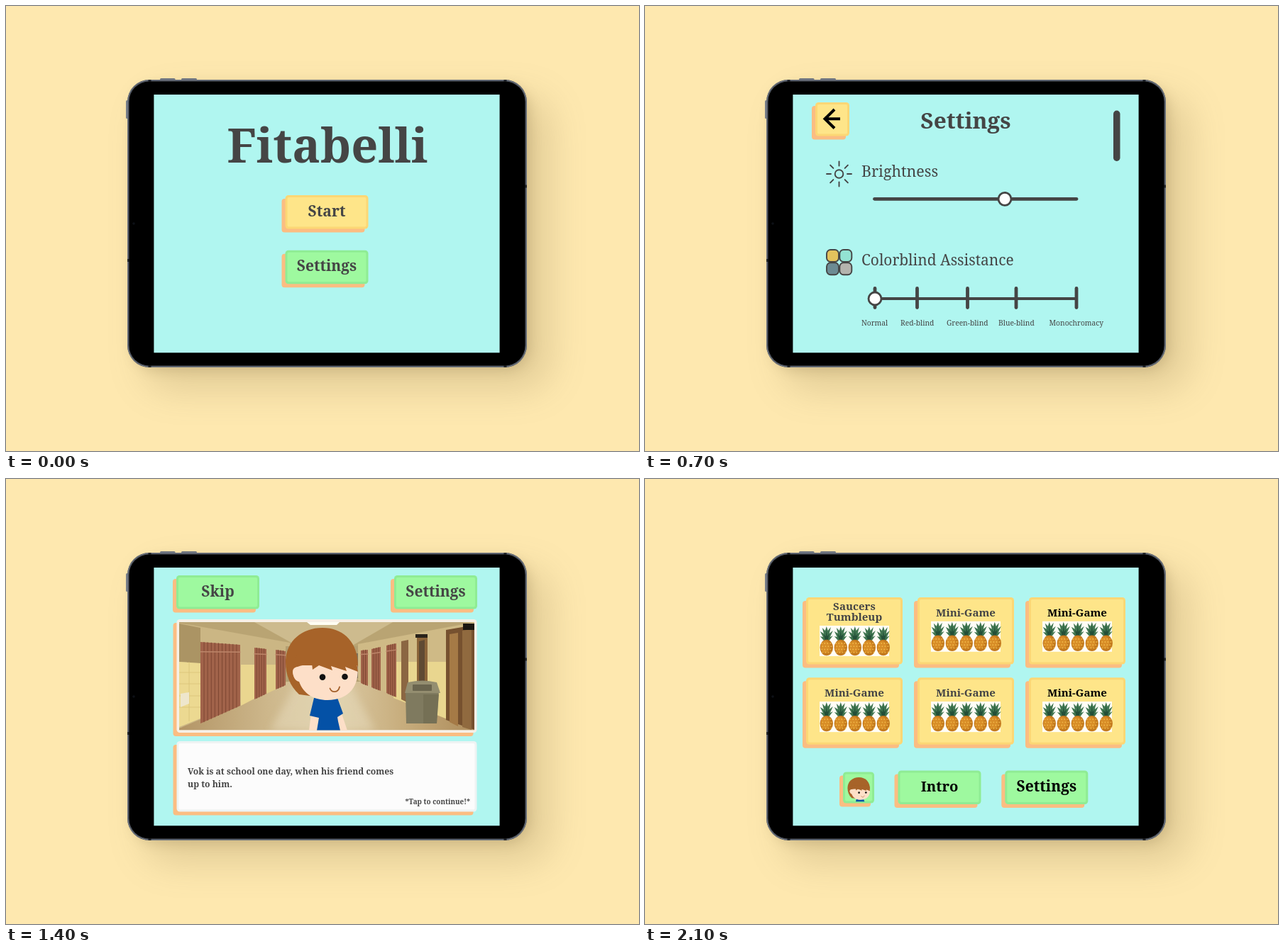
An HTML page for the animation above (2800 ms loop, 892 by 628 pixels).

```html
<!DOCTYPE html>
<html lang="en">
<head>
<meta charset="utf-8">
<title>Tablet game screens</title>
<style>
html, body { margin: 0; width: 100%; height: 100%; overflow: hidden; background: #fee8af; }
svg { display: block; }
text { font-family: "Noto Serif", "Liberation Serif", serif; fill: #454545; }
.b { font-weight: 700; }
</style>
</head>
<body>
<svg id="stage" width="892" height="628" viewBox="0 0 892 628"></svg>
<script>
const INK = '#454545', GREEN = ['#9ef99f', '#8fec94'], YELLOW = ['#fee589', '#fcd775'];
const HOLD = 700;

const rect = (x, y, w, h, fill, r = 0, more = '') =>
  `<rect x="${x}" y="${y}" width="${w}" height="${h}" rx="${r}" fill="${fill}" ${more}/>`;
const path = (d, fill, more = '') => `<path d="${d}" fill="${fill}" ${more}/>`;
const line = (d, w, color = INK) =>
  path(d, 'none', `stroke="${color}" stroke-width="${w}" stroke-linecap="round"`);
const dot = (x, y, r, fill, more = '') => `<circle cx="${x}" cy="${y}" r="${r}" fill="${fill}" ${more}/>`;
const oval = (x, y, rx, ry, fill) => `<ellipse cx="${x}" cy="${y}" rx="${rx}" ry="${ry}" fill="${fill}"/>`;
const text = (s, x, y, size, o = {}) =>
  `<text x="${x}" y="${y}" font-size="${size}" text-anchor="${o.anchor || 'middle'}" ` +
  `class="${o.thin ? '' : 'b'}" style="fill:${o.fill || INK}">${s}</text>`;
const times = (n, f) => Array.from({ length: n }, (_, i) => f(i)).join('');

// Raised panel: orange slab behind, bordered face in front
const panel = (x, y, w, h, [face, edge], bw = 3) =>
  rect(x - 5, y + 5, w, h, '#fbbd82', 4) +
  rect(x, y, w, h, edge, 4.5) +
  rect(x + bw, y + bw, w - 2 * bw, h - 2 * bw, face, 2);

const button = (label, x, y, colors, size = 21, fill = INK) =>
  panel(x, y, 117, 47.5, colors) + text(label, x + 58.5, y + 29.7, size, { fill });

const knob = (x, y) => dot(x, y, 9, '#fff', `stroke="${INK}" stroke-width="2.8"`);

function tablet() {
  const shade = (x, y, w, h, o, blur) =>
    rect(x, y, w, h, '#6e5a30', 34, `opacity="${o}" style="filter:blur(${blur}px)"`);
  const band = (x, y, w, h) => rect(x, y, w, h, '#23262b');
  return rect(0, 0, 892, 628, '#fee8af') +
    shade(196, 130, 570, 410, .2, 27) + shade(178, 112, 560, 402, .2, 9) +
    rect(217, 102, 21.5, 4, '#6f7681', 1.5) + rect(247, 102, 22, 4, '#6f7681', 1.5) +
    rect(169, 133, 4, 26, '#777e88', 1.5) +
    rect(171, 104, 563, 406, '#4c515a', 31) +
    rect(171.7, 104.7, 561.6, 404.6, 'none', 30.4, 'stroke="#757c88" stroke-width="1"') +
    band(200.5, 104, 4, 4) + band(701.5, 104, 4, 4) +
    band(200.5, 506, 4, 4) + band(701.5, 506, 4, 4) +
    band(171, 357, 4, 4) + band(730, 252.5, 4, 4) +
    rect(173.5, 106.5, 558, 401, '#000', 28.5) +
    dot(180, 307, 1.8, '#0d1016') +
    rect(208.4, 125, 487.2, 364.3, '#b0f6f0');
}

const menu = () =>
  text('Fitabelli', 453, 220.5, 66.5) +
  button('Start', 393.5, 267, YELLOW) +
  button('Settings', 393.5, 344.7, GREEN);

function settings() {
  const ray = i => {
    const a = i * Math.PI / 4, c = Math.cos(a), s = Math.sin(a);
    return line(`M${273.5 + 11.5 * c} ${237 + 11.5 * s}L${273.5 + 17.5 * c} ${237 + 17.5 * s}`, 1.9);
  };
  const swatch = (fill, i) => rect(256 + i % 2 * 18.3, 344 + (i >> 1) * 18.3, 17, 17, fill, 5.5,
    `stroke="${INK}" stroke-width="1.9"`);
  const labels = [['Normal', 305], ['Red-blind', 360], ['Green-blind', 425],
    ['Blue-blind', 498], ['Monochromacy', 569.5]];
  const left = { anchor: 'start', thin: true };
  return panel(240, 136, 48, 47.5, YELLOW) +
    path('M275 159.3H254M267 146L253.5 159.3L267 172.5', 'none', 'stroke="#000" stroke-width="4"') +
    text('Settings', 452, 172.5, 31.6) +
    rect(660, 147.5, 9.5, 71.5, INK, 4.7) +
    dot(273.5, 237, 5.8, 'none', `stroke="${INK}" stroke-width="1.9"`) + times(8, ray) +
    text('Brightness', 305, 241, 21.4, left) +
    line('M323.5 272.3H608', 4.8) + knob(507, 272.3) +
    ['#e3c25d', '#93e3d3', '#6c8b93', '#b4b4ae'].map(swatch).join('') +
    text('Colorblind Assistance', 305, 365.5, 20.9, left) +
    line('M324 413H608', 3.8) +
    [324, 383.5, 454.5, 523, 608].map(x => line(`M${x} 398.5V425.5`, 4.8)).join('') +
    knob(324, 413) +
    labels.map(([s, x]) => text(s, x, 451, 10.25, left)).join('');
}

// Upright quad between two vertical edges
const quad = (x1, t1, b1, x2, t2, b2, fill) => path(`M${x1} ${t1}L${x2} ${t2}V${b2}L${x1} ${b1}Z`, fill);

function lockers(x1, t1, b1, x2, t2, b2, n) {
  const slot = i => {
    const k = (i + 1) / (n + 1), at = (a, b) => a + (b - a) * k;
    return line(`M${at(x1, x2)} ${at(t1, t2)}V${at(b1, b2)}`, .9, '#7a4530');
  };
  const mid = (t, b) => t + (b - t) * .12;
  return quad(x1, t1, b1, x2, t2, b2, '#a1634a') +
    times(n, slot) +
    line(`M${x1} ${mid(t1, b1)}L${x2} ${mid(t2, b2)}`, 1.5, '#bd866a');
}

function hallway() {
  return `<g clip-path="url(#photo)">` +
    rect(244, 202, 416, 152.5, 'url(#floor)') +
    path('M412 284H482L520 355H372Z', '#e6dabb', 'opacity=".55" style="filter:blur(6px)"') +
    path('M244 202H660L500 243H394Z', '#b9a473') +
    path('M350 202H545L478 241H420Z', '#cdbb8e') +
    path('M424 202H470L466 206H429Z', '#fffdf2') +
    path('M428 219H466L462 222H432Z', '#f6edcf') +
    // left wall
    quad(244, 203, 352, 400, 231, 285, '#cbb684') +
    quad(244, 204, 258, 274, 210, 260, '#ab9464') +
    quad(244, 258, 350, 274, 260, 338, '#ecd991') +
    quad(331, 262, 320, 350, 262, 310, '#ead68f') +
    quad(367, 262, 303, 380, 262, 297, '#e0cc88') +
    path('M244 273H274M244 289H274M244 306H274M244 322H274M258 258V342', 'none',
      'stroke="#d8c277" stroke-width=".8"') +
    quad(246, 303, 322, 258, 301, 317, '#eee6cc') +
    lockers(274, 230, 345, 330, 234, 320, 10) +
    lockers(350, 238, 311, 367, 240, 303, 4) +
    lockers(380, 241, 297, 394, 243, 291, 3) +
    // far end
    rect(394, 236, 106, 50, '#b39f72') + rect(400, 246, 96, 35, '#7d705a') +
    rect(412, 249, 70, 28, '#b6ab8d') +
    // right wall
    quad(496, 233, 284, 660, 202, 354, '#cfba86') +
    quad(546, 258, 309, 660, 258, 354, '#e9d68f') +
    lockers(500, 242, 288, 510, 241, 292, 2) +
    lockers(515, 240, 294, 528, 237, 299, 3) +
    lockers(536, 235, 302, 550, 232, 308, 4) +
    quad(557, 229, 311, 567, 227, 316, '#8b6642') +
    quad(579, 224, 321, 594, 221, 329, '#8b6439') +
    quad(582, 229, 300, 590, 227, 300, '#5f4a33') +
    quad(620, 213, 340, 660, 206, 354, '#76512f') +
    quad(625, 219, 343, 637, 217, 349, '#a57a46') +
    quad(643, 214, 350, 656, 212, 354, '#906a3f') +
    rect(577, 219, 17, 5, '#2a231b') + rect(644, 204, 16, 9, '#1b1713') +
    // bin
    path('M563 300H610L607 345H564Z', '#7f7a5f') +
    path('M562 302L566 287Q587 282 607 287L612 302Z', '#948e70') +
    rect(573, 290, 27, 9, '#6a654e', 1) +
    path('M588 304H610L607 345H588Z', '#6e694f', 'opacity=".6"') +
    '</g>';
}

const boy = () =>
  path('M430 331L427 355H440L441 332ZM465 333L469 355H481L473 331Z', '#fddfc8') +
  path('M434 309H467L475 331L467 336L468 342L471 355H438L441 337L428 334Z', '#0451a6') +
  path('M413 304C400 292 394 276 394 258C394 230 416 210 446 210C476 210 496 231 496 264L470 290L428 306Z', '#a76329') +
  path('M414 263H495C499 292 483 312 453 312C434 312 419 303 413 286C403 284 401 266 414 264Z', '#fddfc8') +
  path('M404 266L418 263L431 260L432 269L441 263L460 270L458 264L480 271L478 265L496 272L492 246L410 246Z', '#a76329') +
  path('M404 272C404 264 414 263 417 269L417 284C409 285 404 279 404 272Z', '#fddfc8') +
  dot(446, 279.6, 4.3, '#111') + dot(477.5, 279, 4.3, '#111') +
  line('M456.5 295.5C459 302 468 302 470 293.5', 1.8, '#a4602c');

const story = () =>
  button('Skip', 240, 136, GREEN) +
  button('Settings', 547, 136, GREEN) +
  panel(240.5, 198, 423, 160, ['#f7f0e7', '#f7f0e7']) + hallway() +
  `<g clip-path="url(#photo)">${boy()}</g>` +
  panel(240.5, 370, 423, 99.5, ['#fcfcfc', '#eef3f3']) +
  text('Vok is at school one day, when his friend comes', 256, 417.3, 12.2, { anchor: 'start' }) +
  text('up to him.', 256, 434.5, 12.2, { anchor: 'start' }) +
  text('*Tap to continue!*', 654, 458.5, 9.9, { anchor: 'end' });

function fruit(x, y) {
  const scale = i => dot(-6 + i % 4 * 4 + (i >> 2) % 2 * 1.2 - .6, 25 + (i >> 2) * 4.2, .9, '#f0b94a');
  return `<g transform="translate(${x} ${y})">` +
    path('M-3 22L-9 15L-5 16L-9 8L-4 11L-6 3L-2 7L0 1L2 7L6 2L4 11L9 7L5 16L9 14L3 22Z', '#3f7550') +
    path('M-2 21L-4 12L-1 15L0 6L1 15L4 11L2 21Z', '#234f38') +
    oval(0, 31, 9.2, 11.2, '#c47a1e') + oval(-1.5, 30, 6.5, 8.5, '#d88d27') +
    times(16, scale) + '</g>';
}

function card(i) {
  const x = 227 + i % 3 * 157, y = 167 + (i > 2) * 113.3, mid = x + 68;
  const top = y + (i ? 33.8 : 40), fill = i % 3 === 2 ? '#000' : INK;
  const title = i ? text('Mini-Game', mid, y + 26.5, 15.1, { fill })
    : text('Saucers', mid, y + 18.2, 15.1) + text('Tumbleup', mid, y + 33.2, 15.1);
  return panel(x, y, 136, 94.5, YELLOW) + title + rect(x + 19, top, 98, 43, '#fffdf6') +
    times(5, k => fruit(x + 28.8 + k * 20, top));
}

const games = () =>
  times(6, card) +
  panel(279, 413.5, 44, 44, GREEN) +
  `<g transform="translate(163.3 356)scale(.31)"><g clip-path="url(#bust)">${boy()}</g></g>` +
  button('Intro', 356.5, 411.5, GREEN, 20.2, '#000') +
  button('Settings', 507.3, 411.5, GREEN, 21, '#000');

const stage = document.getElementById('stage');
stage.innerHTML = `<defs>
  <linearGradient id="floor" x1="0" y1="0" x2="1" y2="0">
    <stop offset="0" stop-color="#b39566"/><stop offset=".3" stop-color="#cdb78b"/>
    <stop offset=".52" stop-color="#dccba5"/><stop offset=".75" stop-color="#c8ae7e"/>
    <stop offset="1" stop-color="#ad8c5b"/>
  </linearGradient>
  <clipPath id="photo"><rect x="244" y="202" width="416" height="152.5"/></clipPath>
  <clipPath id="bust"><rect x="390" y="200" width="112" height="120"/></clipPath>
  </defs>` + tablet() +
  [menu, settings, story, games].map(f => `<g class="screen">${f()}</g>`).join('');

const screens = [...stage.querySelectorAll('.screen')];

function draw(ms) {
  const now = Math.floor(ms / HOLD) % screens.length;
  screens.forEach((g, i) => g.setAttribute('display', i === now ? 'inline' : 'none'));
}

let start;
function tick(ms) {
  start ??= ms;
  draw(Math.max(0, ms - start));
  requestAnimationFrame(tick);
}
draw(0);
requestAnimationFrame(tick);
</script>
</body>
</html>
```
